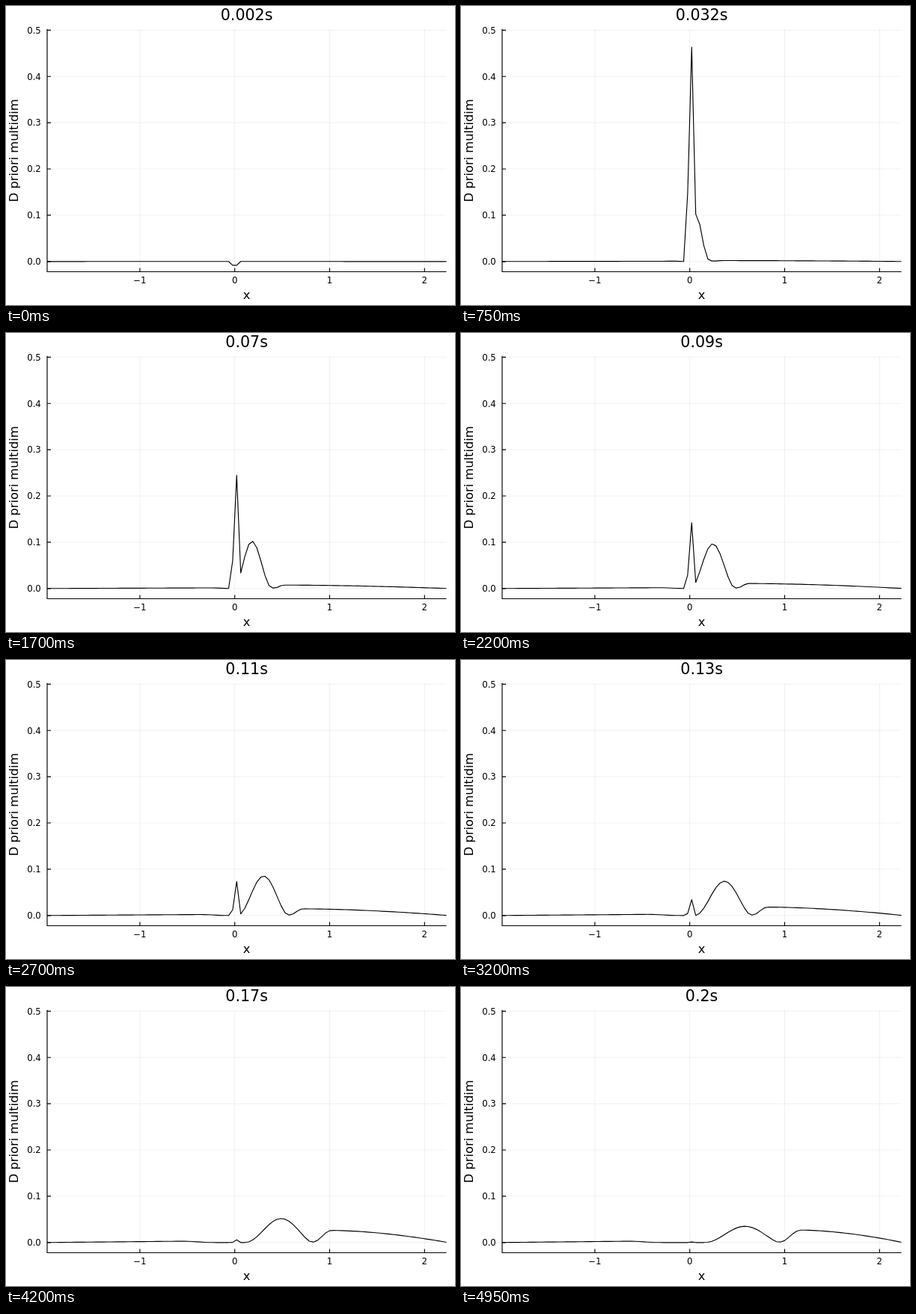
Animation, 600 px wide and 400 px high, one loop 5 s. Source, as an HTML page:

```html
<!DOCTYPE html>
<html lang="en">
<head>
<meta charset="utf-8">
<title>D priori multidim</title>
<style>
html, body { margin: 0; width: 100%; height: 100%; overflow: hidden; background: #fff; }
svg { display: block; width: 600px; height: 400px; }
text { font: 11.7px "DejaVu Sans", sans-serif; text-anchor: middle; }
.axis, #curve { fill: none; stroke: #000; stroke-width: 1.15; }
#curve { stroke-linejoin: round; }
.grid { fill: none; stroke: #000; stroke-opacity: .1; stroke-width: .6; }
.guide { font-size: 16.27px; }
#clock { font-size: 20.6px; }
</style>
</head>
<body>
<svg viewBox="0 0 600 400">
  <path class="grid" id="grid"/>
  <path class="axis" id="axis"/>
  <g id="labels"></g>
  <text class="guide" x="321.6" y="392">x</text>
  <text class="guide" transform="translate(16 193.3) rotate(-90)">D priori multidim</text>
  <text id="clock" x="321.6" y="18.7"></text>
  <path id="curve"/>
</svg>
<script>
const $ = id => document.getElementById(id);
const LEFT = 55, RIGHT = 588.5, TOP = 30.8, BOTTOM = 355.5;
const COUNT = 100, SPIKE = 47, X_MIN = -1.977, X_MAX = 2.23;
const px = x => 305.7 + 126.8 * x;
const py = y => 341.8 - 619 * y;
const clamp = v => Math.min(1, Math.max(0, v));
const ease = v => Math.sin(clamp(v) * Math.PI / 2) ** 2;

// Spike at the origin: a short dip, then 2p(1 - p) with p dying away
function spikeAt(t) {
  if (t < .005) return -4.1 * t;
  const p = .633 * Math.exp(-13.9 * t - 105.6 * t * t);
  return 2 * p * (1 - p) * ease((t - .004) / .01);
}

// Low crest that drifts left
function leftSide(x, t) {
  const crest = -.06 - 2.9 * t, height = Math.min(.0028, .019 * t);
  if (x < crest) return height * (x - X_MIN) / (crest - X_MIN);
  return height * (1 - ease((x - crest) / Math.min(.32, -.04 - crest)));
}

// Hump that drifts right, a trough, and the long tail behind it
function rightSide(x, t) {
  const start = -.057 + .4 * t + 3.4 * t * t;
  const peak = -.035 + 3.08 * t;
  const trough = .11 + 4.15 * t;
  const height = Math.min(.1025, .147 - .56 * t) * ease((t - .002) / .02);
  if (x < peak) return height * ease((x - start) / (peak - start));

  const tail = Math.min(.0268, .2256 * t * t / (t + .08));
  const floor = Math.min(.001, tail);
  if (x < trough) {
    const fall = Math.cos((x - peak) / (trough - peak) * Math.PI / 2);
    return Math.max(floor, height * fall ** (1 + .083 / t));
  }
  const ramp = .06 + .85 * t, top = trough + ramp;
  if (x < top) return Math.max(floor, tail * ease((x - trough) / ramp));
  return tail * (1 - .98 * clamp((x - top) / (X_MAX - top)) ** 1.7);
}

function heightAt(k, x, t) {
  if (k === SPIKE) return spikeAt(t);
  if (k === SPIKE - 1) return spikeAt(t) * (t < .005 ? 1 : clamp(.38 - 1.95 * t));
  return k < SPIKE ? leftSide(x, t) : rightSide(x, t);
}

function buildAxes() {
  let grid = "", axis = `M${LEFT} ${TOP}V${BOTTOM}H${RIGHT}`, labels = "";
  for (let i = 0; i <= 5; i++) {
    const y = py(i / 10);
    grid += `M${LEFT} ${y}H${RIGHT}`;
    axis += `M${LEFT} ${y}h5`;
    labels += `<text x="46.8" y="${y + 4.3}" style="text-anchor:end">${(i / 10).toFixed(1)}</text>`;
  }
  for (let i = -1; i <= 2; i++) {
    const x = px(i);
    grid += `M${x} ${TOP}V${BOTTOM}`;
    axis += `M${x} ${BOTTOM}v-5`;
    labels += `<text x="${x}" y="371.4">${i < 0 ? "\u2212" + -i : i}</text>`;
  }
  $("grid").setAttribute("d", grid);
  $("axis").setAttribute("d", axis);
  $("labels").innerHTML = labels;
}

function draw(step) {
  const t = 2 * (step + 1) / 1000;
  const points = Array.from({ length: COUNT }, (_, k) => {
    const sx = LEFT + k * (RIGHT - LEFT) / (COUNT - 1);
    const y = heightAt(k, (sx - px(0)) / 126.8, t);
    return `${sx.toFixed(2)} ${py(y).toFixed(2)}`;
  });
  $("curve").setAttribute("d", "M" + points.join("L"));
  $("clock").textContent = t + "s";
}

let shown = -1;
function tick() {
  const step = Math.floor(performance.now() % 5000 / 50);
  if (step !== shown) draw(shown = step);
  requestAnimationFrame(tick);
}
buildAxes();
tick();
</script>
</body>
</html>
```
